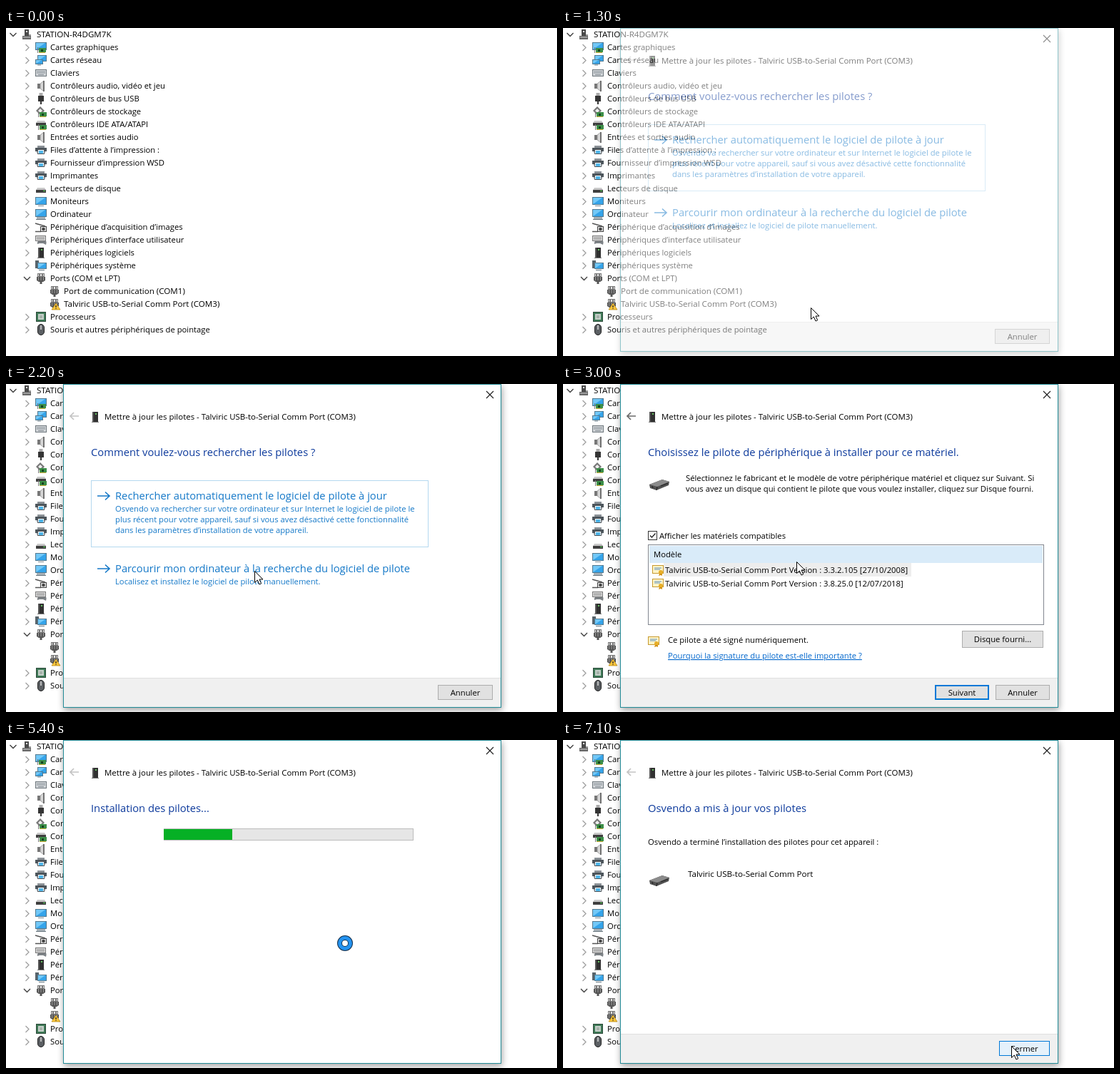
These frames come from a looping animation (772 px wide and 460 px high, 7.2 s). An HTML page:

```html
<!DOCTYPE html>
<html lang="fr">
<head>
<meta charset="utf-8">
<title>Mise à jour du pilote</title>
<style>
  html, body { margin: 0; width: 100%; height: 100%; overflow: hidden; background: #fff; }
  svg { display: block; width: 100%; height: 100%; }
  text { font-family: "Open Sans", "Noto Sans", sans-serif; white-space: pre; }
  .shade { filter: drop-shadow(1px 3px 5px rgba(0, 0, 0, .38)); }
  .menu { filter: drop-shadow(2px 2px 1px rgba(0, 0, 0, .45)); }
</style>
</head>
<body>
<svg id="stage" viewBox="0 0 772 460"></svg>
<script>
const LOOP = 7200, STEP = 100;
const INK = '#000', BLUE = '#0078d7', LINK = '#1478c8', HEAD = '#0d3a9c';
const DEVICE = 'Talviric USB-to-Serial Comm Port';

// Drawing helpers
const rect = (x, y, w, h, fill, stroke = 'none', sw = 1) =>
  `<rect x="${x}" y="${y}" width="${w}" height="${h}" fill="${fill}" stroke="${stroke}" stroke-width="${sw}"/>`;
const path = (d, fill, stroke = 'none', sw = 1) =>
  `<path d="${d}" fill="${fill}" stroke="${stroke}" stroke-width="${sw}"/>`;
const line = (d, stroke, sw = 1) => path(d, 'none', stroke, sw);
const text = (x, y, s, size = 11.25, fill = INK, more = '') =>
  `<text x="${x}" y="${y}" font-size="${size}" fill="${fill}" ${more}>${s}</text>`;
const at = (x, y, s) => `<g transform="translate(${x} ${y})">${s}</g>`;
const group = (id, s) => `<g id="${id}">${s}</g>`;
const heading = s => text(119, 101, s, 14.75, HEAD);
const button = (x, y, w, h, label, fill = '#e1e1e1', stroke = '#adadad', sw = 1) =>
  rect(x + sw / 2, y + sw / 2, w - sw, h - sw, fill, stroke, sw) +
  text(x + w / 2, y + h / 2 + 4, label, 11.25, INK, 'text-anchor="middle"');

// 16 px icons, centred on 0,0
const screen = (x, y, w, h) =>
  rect(x + .5, y + .5, w - 1, h - 1, '#35a4ea', '#51788f') +
  path(`M${x + 1} ${y + h - 1}V${y + 1}H${x + w - 2}Z`, '#72c8f7');
const board = rect(-3, 1, 10, 6, '#3c8f48') + rect(0, 3, 3, 3, '#17421f') +
  line('M-3 7.5H6', '#d0aa38') + line('M-4.5 0V8', '#777');
const plug = rect(-4.5, -6.5, 9, 4, '#e4e4e4', '#777') + line('M-2 -6V-3M2 -6V-3', '#555', 1.5) +
  path('M-6 -2H6V3L3 5H-3L-6 3Z', '#555') + line('M-3.5 -2V3M0 -2V3M3.5 -2V3', '#9a9a9a') +
  line('M0 5V8', '#555', 3);
const disk = path('M-5 -1H5L7 2H-7Z', '#c9c9c9') + rect(-7, 2, 14, 4, '#3f3f3f') + rect(3, 3, 3, 1, '#57d957');
const tower = rect(-4, -7, 8, 14, '#303030') + rect(-4, -7, 2, 14, '#565656') +
  rect(0, -5, 2, 2, '#63c05f') + line('M-5 7.5H5', '#777');
const icons = {
  root: rect(-3, -7, 6, 9, '#4a4a4a') + rect(-1, -5, 2, 2, '#ddd') + rect(-6, 2, 12, 5, '#686868') +
    line('M-5 4H5', '#ccc') + rect(3, 0, 3, 2, '#999'),
  display: screen(-8, -7, 16, 11) + board,
  network: screen(-5, -7, 13, 9) + screen(-8, -1, 11, 7) + line('M-5 7H0', '#68808e'),
  keyboard: rect(-7.5, -4.5, 15, 9, '#d3d7da', '#6c757b') +
    line('M-6 -2H6M-6 0H6', '#8a9298', 1.2) + line('M-4 2.5H4', '#8a9298', 1.2),
  speaker: rect(-5, -3, 4, 7, '#777') + path('M-1 -3L4 -7V8L-1 4Z', '#d6d6d6', '#8c8c8c', .7) +
    line('M4 -7V8', '#4c4c4c', 1.4),
  usb: rect(-2.5, -8, 5, 4, '#aaa') + rect(-4, -4, 8, 8, '#343434') + line('M0 3V8', '#343434', 2),
  storage: path('M-7 -1L-1 -7L5 -1L-1 5Z', '#777') + path('M-4 -1L-1 -4L2 -1L-1 2Z', '#eee') + at(1, 0, board),
  ide: path('M-5 -5H5L7 -2H-7Z', '#c9c9c9') + rect(-7, -2, 14, 4, '#3f3f3f') + at(1, 0, board),
  printer: rect(-5, -6, 10, 3, '#8b9196') + rect(-8, -3, 16, 5, '#4d555b') + rect(-7, 2, 14, 2, '#c9ced2') +
    rect(-4.5, -.5, 9, 6, '#fff', '#4d555b') + rect(-3, 1, 6, 4, '#4db4e8'),
  disk,
  monitor: screen(-8, -6, 16, 11) + line('M-4 6.5H4', '#7e8c94'),
  computer: screen(-8, -7, 16, 11) + rect(-6, 4, 12, 3, '#a7b1b7') + line('M-7 7.5H7', '#66747d'),
  camera: line('M-8 -5L6 -1M-8 6.5H0', '#555', 1.4) + rect(-.5, -.5, 8, 7, '#e4e4e4', '#444') +
    `<circle cx="3.5" cy="3" r="2.3" fill="#444"/>`,
  hid: rect(-7.5, -5.5, 14, 7, '#dcdcdc', '#777') + line('M-6 -3H5M-6 -1H5', '#888', 1.2) +
    path('M-5 6Q-6 1 -1 2H4Q9 0 7 7L3 5H-2Z', '#7c8185'),
  tower,
  system: rect(-8, -7, 5, 11, '#58646b') + screen(-5, -4, 13, 9) + line('M-3 6.5H5', '#66747d'),
  plug,
  warn: plug + path('M2 -1L8 8H-4Z', '#ffc83d', '#b07f00', .7) + line('M2 2V5M2 6V7', '#222', 1.3),
  chip: rect(-6.5, -6.5, 13, 13, '#3f7a57', '#2b4a39') + rect(-4, -4, 8, 8, '#c4cfc8') +
    rect(-2, -2, 4, 4, '#a5b1a9'),
  mouse: `<rect x="-4.5" y="-7.5" width="9" height="15" rx="4.5" fill="#5b5f63" stroke="#222"/>` +
    line('M0 -6V0', '#ddd', 1.5),
};
const cert = rect(-7.5, -6.5, 15, 11, '#fff4c6', '#c6992e') + line('M-5 -3H5M-5 -1H3', '#5f92c2') +
  `<circle cx="4" cy="3" r="3" fill="#e8ae27"/>` + path('M2 5L1 8L4 7L6 8L6 5Z', '#d29317');
const connector = path('M-14 -1L4 -8L14 -5L13 0L-4 7L-13 4Z', '#515151') +
  path('M-14 -1L4 -8L14 -5L-3 2Z', '#8b8b8b') + line('M-3 2L-4 7M-10 1L-9 4M2 1L12 -3', '#272727', 1.2);

// Device tree
const rows = [
  ['display', 'Cartes graphiques'], ['network', 'Cartes réseau'], ['keyboard', 'Claviers'],
  ['speaker', 'Contrôleurs audio, vidéo et jeu'], ['usb', 'Contrôleurs de bus USB'],
  ['storage', 'Contrôleurs de stockage'], ['ide', 'Contrôleurs IDE ATA/ATAPI'],
  ['speaker', 'Entrées et sorties audio'], ['printer', 'Files d’attente à l’impression :'],
  ['printer', 'Fournisseur d’impression WSD'], ['printer', 'Imprimantes'], ['disk', 'Lecteurs de disque'],
  ['monitor', 'Moniteurs'], ['computer', 'Ordinateur'], ['camera', 'Périphérique d’acquisition d’images'],
  ['hid', 'Périphériques d’interface utilisateur'], ['tower', 'Périphériques logiciels'],
  ['system', 'Périphériques système'], ['plug', 'Ports (COM et LPT)'],
  ['plug', 'Port de communication (COM1)', 1], ['warn', DEVICE + ' (COM3)', 1],
  ['chip', 'Processeurs'], ['mouse', 'Souris et autres périphériques de pointage'],
];
const closed = y => line(`M27.5 ${y - 4}L32 ${y + .5}L27.5 ${y + 5}`, '#a0a0a0', 1.3);
const open = (x, y) => line(`M${x - 4.5} ${y - 2}L${x} ${y + 2.5}L${x + 4.5} ${y - 2}`, '#404040', 1.4);
const tree = open(10, 9) + at(29, 9, icons.root) + text(43, 13, 'STATION-R4DGM7K', 11.6) +
  rows.map(([icon, label, child], i) => {
    const y = 27 + 18 * i;
    const arrow = child ? '' : icon === 'plug' ? open(29.5, y) : closed(y);
    return arrow + at(child ? 68 : 49, y, icons[icon]) +
      text(child ? 81 : 62, y + 4, label, child ? 11.6 : 11.25);
  }).join('');

const menu = `<g class="menu">${rect(295.5, 390.5, 318, 90, '#f2f2f2', '#bdbdbd')}</g>` +
  group('menuHot', rect(298, 393, 313, 22, '#91c9f7')) +
  ['Mettre à jour le pilote', 'Désactiver l’appareil', 'Désinstaller l’appareil']
    .map((s, i) => text(330, 408 + 22 * i, s)).join('');

// Wizard pages
const arrow = y => line(`M128 ${y}H145M139 ${y - 5.5}L145 ${y}L139 ${y + 5.5}`, LINK, 1.6);
const choice = (y, title, lines) => arrow(y) + text(153, y + 5, title, 14.75, LINK) +
  lines.map((s, i) => text(153, y + 22 + 15 * i, s, 11.25, LINK)).join('');
const search = heading('Comment voulez-vous rechercher les pilotes ?') +
  rect(119.5, 135.5, 472, 93, 'none', '#b4d8ef') +
  choice(157, 'Rechercher automatiquement le logiciel de pilote à jour', [
    'Osvendo va rechercher sur votre ordinateur et sur Internet le logiciel de pilote le',
    'plus récent pour votre appareil, sauf si vous avez désactivé cette fonctionnalité',
    'dans les paramètres d’installation de votre appareil.']) +
  choice(259, 'Parcourir mon ordinateur à la recherche du logiciel de pilote',
    ['Localisez et installez le logiciel de pilote manuellement.']) +
  button(605, 422, 77, 21, 'Annuler');

const version = (y, v, more = '') =>
  at(133, y, cert) + text(143, y + 4, `${DEVICE} Version : ${v}`, 11.3, INK, more);
const pick = heading('Choisissez le pilote de périphérique à installer pour ce matériel.') +
  at(135, 142, connector) +
  text(172, 136, 'Sélectionnez le fabricant et le modèle de votre périphérique matériel et cliquez sur Suivant. Si') +
  text(172, 151, 'vous avez un disque qui contient le pilote que vous voulez installer, cliquez sur Disque fourni.') +
  rect(119.5, 206.5, 12, 12, '#fff', '#333') + line('M122 212.5L124.5 215L129.5 209.5', '#222', 1.3) +
  text(135, 217, 'Afficher les matériels compatibles') +
  rect(119.5, 225.5, 554, 112, '#fff', '#828790') + line('M671.5 228V250', '#e0e0e0') +
  group('headHot', rect(121, 227, 551, 24, '#d9ebf9')) + text(127, 243, 'Modèle') +
  `<rect id="rowBack" x="141" y="251" width="347" height="19"/>` +
  version(261, '3.3.2.105 [27/10/2008]', 'id="rowText"') + version(280, '3.8.25.0 [12/07/2018]') +
  at(127, 361, cert) + text(147, 363, 'Ce pilote a été signé numériquement.') +
  text(147, 385, 'Pourquoi la signature du pilote est-elle importante ?', 11.25, '#0066cc', 'text-decoration="underline"') +
  button(559, 346, 114, 24, 'Disque fourni...') +
  button(521, 422, 76, 21, 'Suivant', '#e1e1e1', BLUE, 2) + button(606, 422, 76, 21, 'Annuler');

const install = heading('Installation des pilotes...') +
  rect(221.5, 124.5, 349, 16, '#e6e6e6', '#bcbcbc') +
  `<rect id="bar" y="125" height="15" fill="#06b025"/>`;

const done = heading('Osvendo a mis à jour vos pilotes') +
  text(119, 147, 'Osvendo a terminé l’installation des pilotes pour cet appareil :') +
  at(135, 198, connector) + text(175, 192, DEVICE, 11.6) +
  group('closeCold', button(611, 422, 71, 21, 'Fermer', '#e1e1e1', BLUE)) +
  group('closeHot', button(611, 422, 71, 21, 'Fermer', '#e5f1fb', BLUE));

const dialog = `<g class="shade">${rect(80.5, .5, 613, 453, '#fff', '#238c98')}</g>` +
  line('M673 10L683 20M683 10L673 20', '#222', 1.2) +
  `<path id="back" d="M102 45H90M95 40L90 45L95 50" fill="none" stroke-width="1.7"/>` +
  at(125, 46, tower) + text(138, 50, `Mettre à jour les pilotes - ${DEVICE} (COM3)`, 11.48) +
  group('footer', rect(81, 412, 612, 41, '#f0f0f0') + line('M81 412.5H693', '#dfdfdf')) +
  group('search', search) + group('pick', pick) + group('install', install) + group('done', done);

const pointer = path('M.5 .5V16.5L4.3 13L7 19L9.7 17.8L7 12H12Z', '#fff', '#000');
const busy = `<circle r="7.5" fill="#fff" stroke="#16324e" stroke-width="7"/>` +
  `<circle r="7.5" fill="none" stroke="#2493f0" stroke-width="5"/>`;

document.getElementById('stage').innerHTML =
  rect(0, 0, 772, 460, '#fff') + group('selected', rect(79, 378, 222, 18, '#cce8ff')) + tree +
  group('menu', menu) + group('dialog', dialog) + group('pointer', pointer) + group('busy', busy);

const el = id => document.getElementById(id);
const show = (id, on) => el(id).setAttribute('display', on ? 'inline' : 'none');
const set = (id, name, v) => el(id).setAttribute(name, v);

// Pointer stops: time, x, y
const stops = [
  [100, 400, 458], [400, 295, 389], [600, 295, 389], [800, 310, 390], [1000, 345, 402], [1200, 345, 402],
  [1600, 360, 336], [2000, 350, 262], [2400, 345, 262], [2900, 327, 249], [3100, 327, 249],
  [3400, 322, 259], [3600, 322, 259], [4200, 548, 431], [4700, 548, 431], [5300, 475, 285],
  [6300, 475, 285], [6900, 628, 429], [LOOP, 628, 429],
];
function pointerAt(t) {
  const i = Math.max(1, stops.findIndex(s => s[0] > t));
  const [a, b] = [stops[i - 1], stops[i]];
  const k = Math.max(0, (t - a[0]) / (b[0] - a[0]));
  const e = k * k * (3 - 2 * k);
  return [a[1] + (b[1] - a[1]) * e, a[2] + (b[2] - a[2]) * e];
}

function draw(t) {
  const within = (a, b) => t >= a && t < b;
  const [x, y] = pointerAt(t);
  const page = t < 2400 ? 'search' : t < 4700 ? 'pick' : t < 6100 ? 'install' : 'done';

  show('selected', within(400, 1300));
  show('menu', within(500, 1200));
  show('menuHot', within(900, 1200));

  show('dialog', t >= 1300);
  set('dialog', 'opacity', t < 1700 ? 1 - .5 * Math.exp((1300 - t) / 100) : 1);
  for (const id of ['search', 'pick', 'install', 'done']) show(id, id === page);
  show('footer', page !== 'install');
  set('back', 'stroke', page === 'pick' ? '#6a6a6a' : '#c3c3c3');

  const chosen = t >= 3500;
  show('headHot', page === 'pick' && y < 251 && y > 226);
  set('rowBack', 'fill', chosen ? '#2f8fee' : '#ededed');
  set('rowText', 'fill', chosen ? '#fff' : INK);

  // The bar stalls near the end of the installation
  const run = t < 5700 ? t : t < 5800 ? 5600 : 5800;
  const end = Math.max(0, (run - 4800) * .16), start = Math.max(0, end - 120);
  set('bar', 'x', 221 + start);
  set('bar', 'width', end - start);

  const hot = x > 611 && y > 421;
  show('closeHot', hot);
  show('closeCold', !hot);

  const waiting = within(4800, 6100);
  show('pointer', t >= 100 && !waiting);
  show('busy', waiting);
  set(waiting ? 'busy' : 'pointer', 'transform', `translate(${Math.round(x)} ${Math.round(y)})`);
}

const origin = performance.now();
function tick() {
  const t = (performance.now() - origin) % LOOP;
  draw(Math.floor(t / STEP) * STEP);
  requestAnimationFrame(tick);
}
tick();
</script>
</body>
</html>
```
